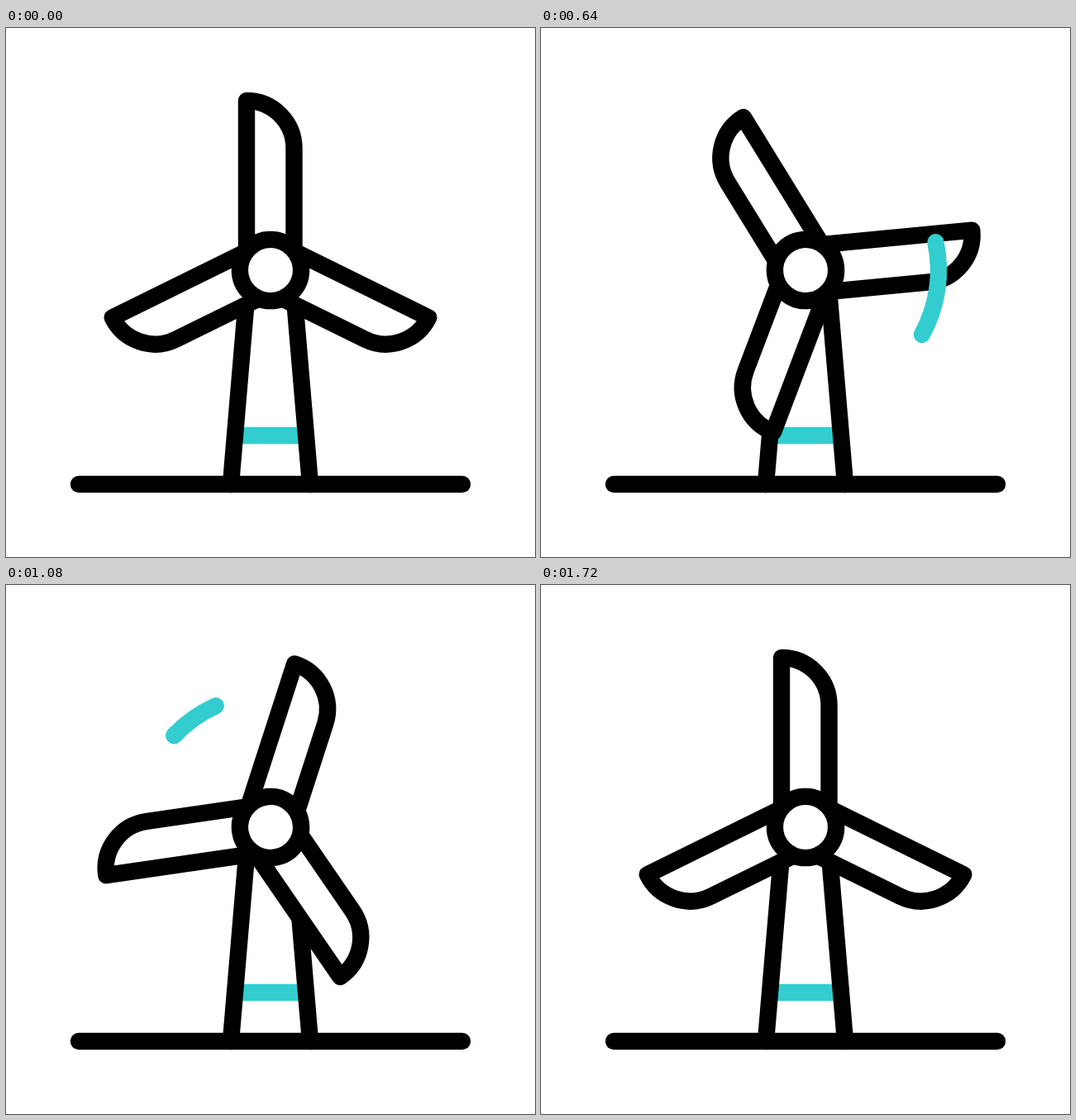
These frames come from a looping animation (640 by 640 pixels, 1.96 s). An HTML page with a canvas:

```html
<!DOCTYPE html>
<html lang="en">
<head>
<meta charset="utf-8">
<title>Wind turbine</title>
<style>
  html, body { margin: 0; width: 100%; height: 100%; overflow: hidden; background: #fff; }
  canvas { display: block; width: 100vw; height: 100vh; }
</style>
</head>
<body>
<canvas id="stage" width="640" height="640"></canvas>
<script>
const ctx = document.getElementById('stage').getContext('2d');
const LOOP = 1960, STEP = 40, TURN = Math.PI * 2;
const BLACK = '#000', TEAL = '#33cdcf', WHITE = '#fff';
const HUB = { x: 320, y: 293 };
const BLADE_WIDTH = 57.5;

// Symmetric cubic ease with handles (0.51, 0) and (0.49, 1)
function ease(p) {
  const a = 0.51;
  let low = 0, high = 1;
  for (let i = 0; i < 30; i++) {
    const u = (low + high) / 2, v = 1 - u;
    const x = 3 * a * u * v * v + 3 * (1 - a) * u * u * v + u ** 3;
    if (x < p) low = u; else high = u;
  }
  return low * low * (3 - 2 * low);
}

function progress(time, start, end) {
  if (time <= start) return 0;
  if (time >= end) return 1;
  return ease((time - start) / (end - start));
}

function line(x1, y1, x2, y2, color) {
  ctx.strokeStyle = color;
  ctx.beginPath();
  ctx.moveTo(x1, y1);
  ctx.lineTo(x2, y2);
  ctx.stroke();
}

// Blade pointing up; side is the x of its sharp edge, flip mirrors it
function blade(angle, side, length, root, flip = 1) {
  const shoulder = BLADE_WIDTH - length;
  ctx.save();
  ctx.scale(flip, 1);
  ctx.rotate(angle);
  ctx.beginPath();
  ctx.moveTo(side, -root);
  ctx.lineTo(side, -length);
  ctx.arc(side, shoulder, BLADE_WIDTH, -TURN / 4, 0);
  ctx.lineTo(side + BLADE_WIDTH, -root);
  ctx.fill();
  ctx.stroke();
  ctx.restore();
}

function tower() {
  line(285, 493, 355, 493, TEAL);
  line(291.2, 325, 272, 552, BLACK);
  line(348.8, 325, 368, 552, BLACK);
  line(88, 552, 552, 552, BLACK);
}

function rotor(angle) {
  const droop = (90 + 26.2) / 360 * TURN;
  ctx.save();
  ctx.translate(HUB.x, HUB.y);
  ctx.rotate(angle);
  ctx.strokeStyle = BLACK;
  ctx.fillStyle = WHITE;
  blade(droop, -33, 197, 20);
  blade(droop, -33, 197, 20, -1);
  blade(0, -29, 205, 24);
  ctx.beginPath();
  ctx.arc(0, 0, 37.1, 0, TURN);
  ctx.fill();
  ctx.stroke();
  ctx.restore();
}

function breeze(tail, head) {
  if (head <= tail) return;
  ctx.strokeStyle = TEAL;
  ctx.beginPath();
  ctx.arc(HUB.x, HUB.y, 161, (tail - 0.25) * TURN, (head - 0.25) * TURN);
  ctx.stroke();
}

function draw(time) {
  ctx.fillStyle = WHITE;
  ctx.fillRect(0, 0, 640, 640);
  ctx.lineWidth = 20.4;
  ctx.lineCap = ctx.lineJoin = 'round';
  tower();
  rotor(progress(time, 40, 1720) * TURN);
  breeze(progress(time, 240, 1400), progress(time, 160, 1320));
}

const begin = performance.now();
function frame() {
  const time = (performance.now() - begin) % LOOP;
  draw(Math.floor(time / STEP) * STEP);
  requestAnimationFrame(frame);
}
frame();
</script>
</body>
</html>
```
